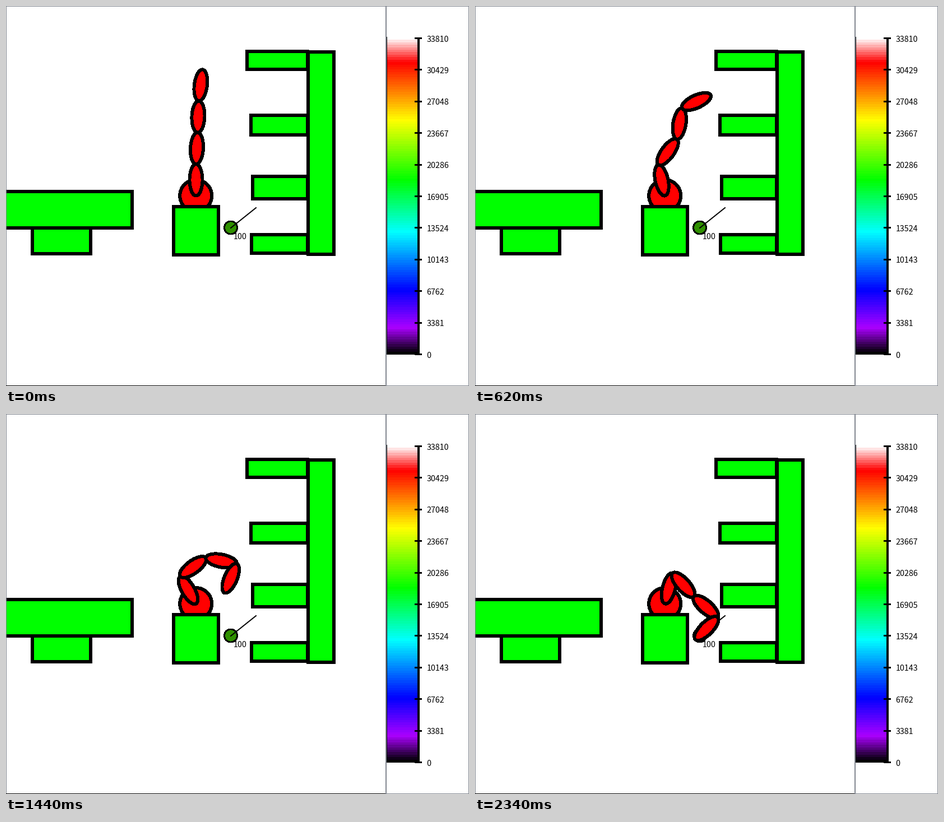
A matplotlib script that plays this animation: 826 by 678 pixels, repeating every 2.36 s.

```python
import numpy as np
import matplotlib.pyplot as plt
from matplotlib.animation import FuncAnimation
from matplotlib.colors import LinearSegmentedColormap
from matplotlib.patches import Circle, Ellipse, Rectangle

W, H, DPI = 826, 678, 100
FRAMES, STEP_MS = 118, 20
PT = 72 / DPI  # points per pixel
GREEN, RED, GREY = "#00ff00", "#ff0000", "#828790"

fig = plt.figure(figsize=(W / DPI, H / DPI), dpi=DPI, facecolor="white")
ax = fig.add_axes([0, 0, 1, 1])


def add(patch, fill, width, z):
    patch.set(facecolor=fill, edgecolor="black", linewidth=width * PT,
              joinstyle="round", antialiased=False, zorder=z)
    return ax.add_patch(patch)


def block(x0, y0, x1, y1, z=2):
    add(Rectangle((x0, y0), x1 - x0, y1 - y0), GREEN, 6, z)


def bar(x, y, w, h, color="black"):
    ax.add_patch(Rectangle((x, y), w, h, color=color, linewidth=0,
                           antialiased=False, zorder=5))


def label(x, y, text):
    ax.text(x, y, text, family="Noto Sans CJK JP", fontsize=14.3 * PT,
            color="black", va="baseline", zorder=3)


# Table and shelf unit
block(-6, 331, 225, 396)
block(47, 396, 151, 442)
block(539, 82, 585, 443)
for left, top, bottom in [(430, 81, 113), (437, 195, 230),
                          (440, 304, 344), (438, 408, 441)]:
    block(left, top, 538, bottom)

# Goal marker
add(Circle((401, 395.5), 11.5), "#2f9000", 1.8, 3)
ax.plot([401, 446], [396, 360], color="black", linewidth=2 * PT, zorder=3)
label(405.5, 415.5, "100")

# Colour scale
TOP, BOTTOM, TICKS = 56, 621, 10
stops = zip([0, 0.08, 0.2, 0.385, 0.55, 0.74, 0.925, 1],
            ["black", "#aa00ff", "blue", "cyan", "lime", "yellow", "red", "white"])
scale = LinearSegmentedColormap.from_list("scale", list(stops), N=128)
ax.imshow(np.linspace(1, 0, 128)[:, None], cmap=scale, aspect="auto",
          extent=(680, 736, BOTTOM, TOP), interpolation="nearest", zorder=1)
bar(679, TOP - 1, 1, BOTTOM - TOP + 2)
bar(679, BOTTOM - 1, 59, 2)
bar(734, TOP, 4, BOTTOM - TOP)
for i in range(TICKS + 1):
    y = TOP + (BOTTOM - TOP - 1) * i / TICKS
    bar(729, round(y), 13, 3)
    label(750.5, y + 7.5, str(3381 * (TICKS - i)))

# Window edges
for x, w in [(0, 1), (677, 2), (W - 1, 1)]:
    bar(x, 0, w, H, GREY)
for y in (0, H - 1):
    bar(0, y, W, 1, GREY)
bar(0, H - 1, 677, 1)

# Arm on its pedestal
BASE = np.array([339, 338.5])
LENGTH = 56.4
add(Circle((338.7, 338.5), 28.5), RED, 4.9, 6)
block(299, 358, 379, 444, z=7)
links = [add(Ellipse((0, 0), 23, LENGTH), RED, 4.9, 8 + i) for i in range(4)]

# Key poses, with joint angles in degrees, joined by linear joint motion
POSES = {
    0: (0, 3, -1, 5),
    15: (9, 37, -18, 35),
    27: (-6, 44, -33, 52),
    43: (-31, 62, -10, 70),
    57: (-21, 68, 33, 83),
    72: (-30, 84, 47, 102),
    84: (-40, 111, 32, 98),
    98: (-22, 126, 17, 88),
    108: (1, 134, 1, 81),
    117: (14, 124, -7, 94),
}
TIMES, ANGLES = list(POSES), np.array(list(POSES.values()))


def draw(frame):
    turns = [np.interp(frame, TIMES, joint) for joint in ANGLES.T]
    start = BASE
    for link, angle in zip(links, np.cumsum(turns)):
        a = np.radians(angle)
        end = start + LENGTH * np.array([np.sin(a), -np.cos(a)])
        link.set_center((start + end) / 2)
        link.set_angle(angle)
        start = end
    return links


ax.set_xlim(0, W)
ax.set_ylim(H, 0)
ax.axis("off")

anim = FuncAnimation(fig, draw, frames=FRAMES, interval=STEP_MS,
                     init_func=lambda: draw(0), repeat=True, repeat_delay=0)
plt.show()
```
